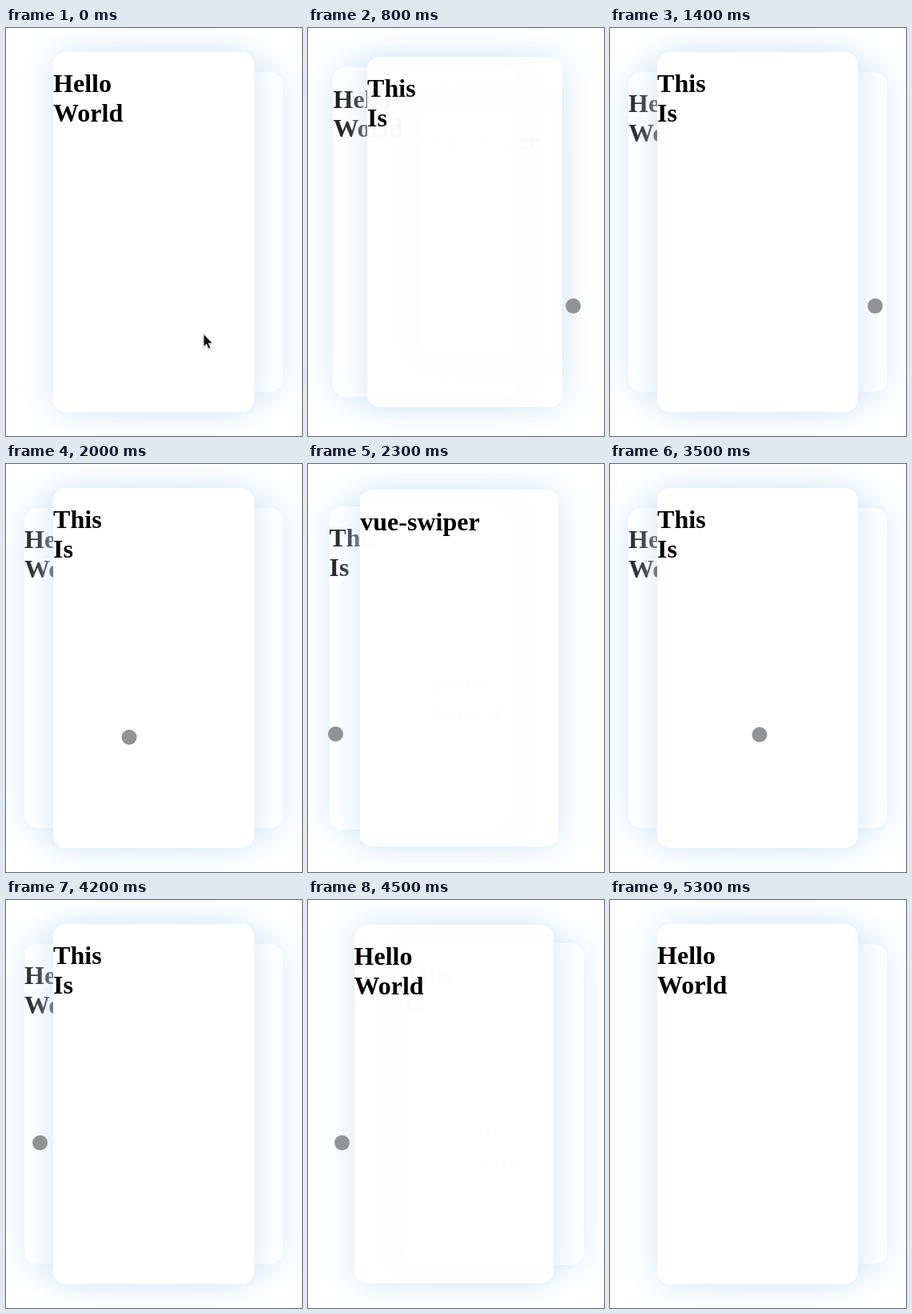
An HTML page for the animation above (5.5 s loop, 370x510 px).

```html
<!DOCTYPE html>
<html lang="en">
<head>
<meta charset="utf-8">
<title>Card swiper</title>
<style>
  html, body { margin: 0; width: 100%; height: 100%; overflow: hidden; background: #fff; }
  #stage { position: relative; width: 370px; height: 510px; overflow: hidden; }
  .card {
    position: absolute; border-radius: 16px; background: #fff;
    box-shadow: 0 0 42px #d0e6f6;
  }
  h1 {
    margin: 21.4px 0 0; color: #000;
    font: bold 32px/36.8px "Liberation Serif", "Times New Roman", serif;
  }
  #arrow, #touch { position: absolute; left: 0; top: 0; z-index: 1000; }
  #arrow { filter: drop-shadow(0 1px 1px #0004); }
  #touch { width: 19px; height: 19px; margin: -9.5px; border-radius: 50%; background: #929395; }
</style>
</head>
<body>
<div id="stage">
  <div class="card"><h1>Hello<br>World</h1></div>
  <div class="card"><h1>This<br>Is</h1></div>
  <div class="card"><h1>vue-swiper</h1></div>
  <svg id="arrow" width="370" height="510">
    <path d="M247 382.5v16l3.6-3.4 2.5 5.8 2.6-1.1-2.5-5.7h5z" fill="#080812" stroke="#fff" stroke-width=".8"/>
  </svg>
  <div id="touch"></div>
</div>
<script>
const LOOP = 5500, SLIDE = 400, TOUCH_START = 100;
const CENTER_X = 184.4, CENTER_Y = 255, WIDTH = 250.6, HEIGHT = 450;

// Start times of the slides in each direction
const forward = [615, 2050], back = [3050, 4205];

// Straight moves of the touch point: [start, end, x, y]
const moves = [
  [100, 500, 331, 347],
  [1750, 2170, 34, 337],
  [2500, 3000, 258, 335],
  [3000, 3500, 187, 338],
  [3500, 3750, 42, 303],
  [4780, 5250, 292, 525]
];

const cards = [...document.querySelectorAll(".card")];
const arrow = document.getElementById("arrow");
const touch = document.getElementById("touch");

const mix = (a, b, k) => a + (b - a) * k;
const clamp = v => Math.min(1, Math.max(0, v));
const progress = (t, start, end) => clamp((t - start) / (end - start));
const bezier = (a, b, s) => 3 * a * s * (1 - s) ** 2 + 3 * b * s * s * (1 - s) + s ** 3;

// The CSS "ease" curve
function ease(k) {
  let low = 0, high = 1;
  for (let i = 0; i < 20; i++) {
    const mid = (low + high) / 2;
    if (bezier(.25, .25, mid) < k) low = mid; else high = mid;
  }
  return bezier(.1, 1, low);
}

// Offset 0 is the front, 1 the side; by 2 the card has shrunk away.
function placeCard(card, offset) {
  const distance = Math.abs(offset);
  const near = clamp(distance), far = clamp(distance - 1);
  const scale = mix(1, 8 / 9, near) * (1 - far);
  const width = WIDTH * scale, height = HEIGHT * scale;
  const x = CENTER_X + Math.sign(offset) * near * mix(50, 15, far);
  Object.assign(card.style, {
    left: x - width / 2 + "px",
    top: CENTER_Y - height / 2 + "px",
    width: width + "px",
    height: height + "px",
    opacity: mix(1, .86, near) * (1 - far),
    zIndex: 500 - Math.round(distance * 100)
  });
}

function draw(t) {
  const slid = starts => starts.reduce((sum, s) => sum + ease(progress(t, s, s + SLIDE)), 0);
  const position = slid(forward) - slid(back);
  cards.forEach((card, i) => placeCard(card, i - position));

  let x = 251, y = 390;
  for (const [start, end, toX, toY] of moves) {
    const k = progress(t, start, end);
    x = mix(x, toX, k);
    y = mix(y, toY, k);
  }
  const touching = t >= TOUCH_START;
  arrow.style.display = touching ? "none" : "block";
  touch.style.display = touching ? "block" : "none";
  touch.style.transform = `translate(${x}px, ${y}px)`;
}

function frame() {
  draw(performance.now() % LOOP);
  requestAnimationFrame(frame);
}
frame();
</script>
</body>
</html>
```
